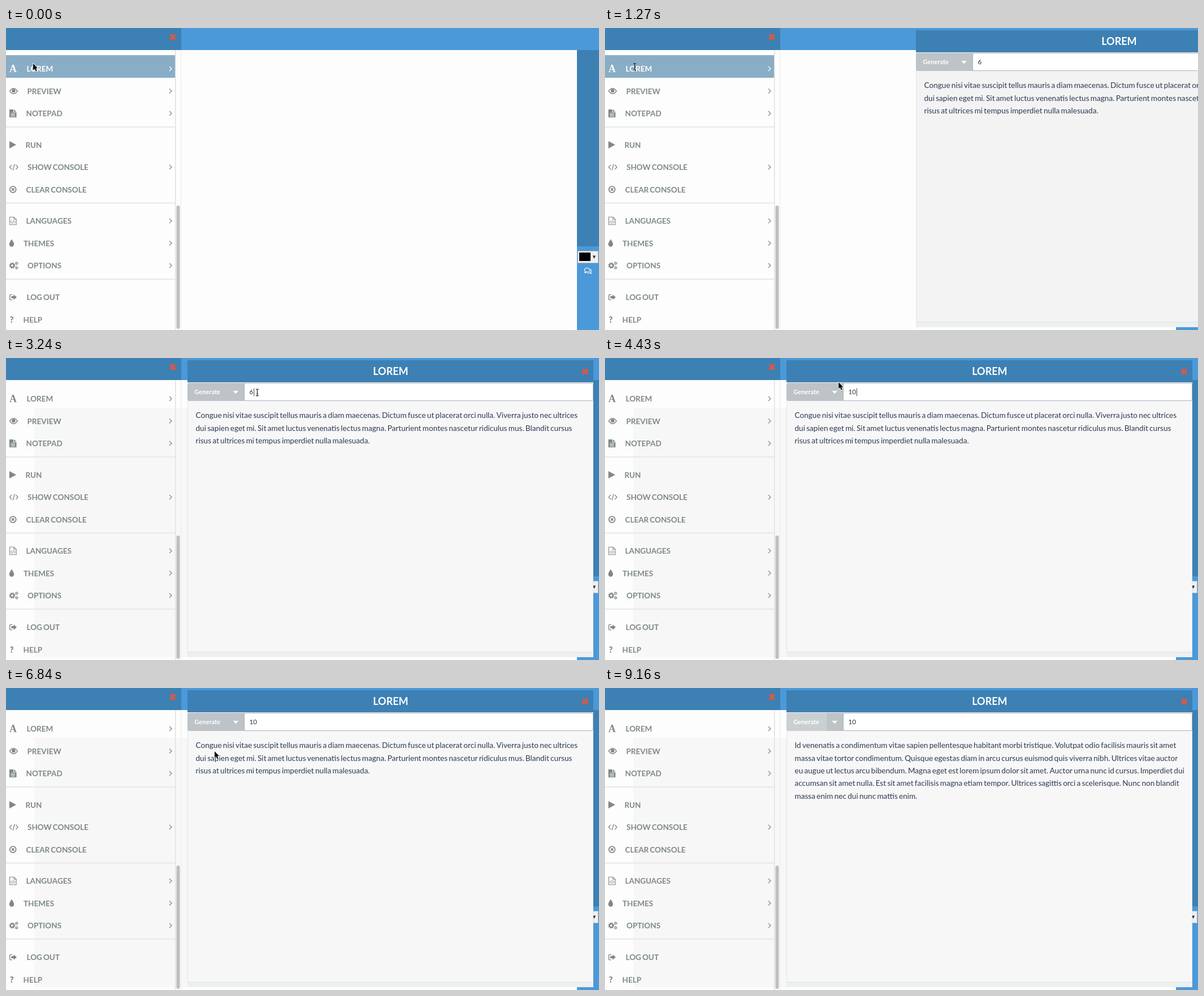
Write an HTML page with a canvas that moves like this. It is 1049 px wide and 534 px high and loops after 9.71 s.

```html
<!DOCTYPE html>
<html lang="en">
<head>
<meta charset="utf-8">
<title>Lorem panel</title>
<style>
html, body { margin: 0; width: 100%; height: 100%; overflow: hidden; background: #fdfdfd; }
canvas { display: block; width: 1049px; height: 534px; }
</style>
</head>
<body>
<canvas id="stage"></canvas>
<script>
const W = 1049, H = 534, LOOP = 9710;
const canvas = document.getElementById('stage');
const ratio = window.devicePixelRatio || 1;
canvas.width = Math.round(W * ratio);
canvas.height = Math.round(H * ratio);
const c = canvas.getContext('2d');

const DARK = '#3d80b4', LIGHT = '#4b99d9', GREY = '#7f8889', RED = '#e0573f', INK = '#2c3b51';
const PAPER = '#fdfdfd', BUTTON = '#bdc3c7', HOVER = '#cacfd2';
const PANEL = 718;

function rect(x, y, w, h, color) {
  c.fillStyle = color;
  c.fillRect(x, y, w, h);
}

function rounded(x, y, w, h, r, color) {
  c.beginPath();
  c.roundRect(x, y, w, h, r);
  c.fillStyle = color;
  c.fill();
}

function text(str, x, y, size, color, weight = 400, align = 'left', family = 'Lato, sans-serif') {
  c.font = `${weight} ${size}px ${family}`;
  c.wordSpacing = `${-0.09 * size}px`;
  c.textAlign = align;
  c.fillStyle = color;
  c.fillText(str, x, y);
}

function fill(d, color) {
  c.fillStyle = color;
  c.fill(new Path2D(d));
}

function stroke(d, color, width) {
  c.strokeStyle = color;
  c.lineWidth = width;
  c.stroke(new Path2D(d));
}

function dot(x, y, r, color) {
  c.beginPath();
  c.arc(x, y, r, 0, Math.PI * 2);
  c.fillStyle = color;
  c.fill();
}

function ring(x, y, r, width, color) {
  c.beginPath();
  c.arc(x, y, r, 0, Math.PI * 2);
  c.strokeStyle = color;
  c.lineWidth = width;
  c.stroke();
}

function at(x, y, draw) {
  c.save();
  c.translate(x, y);
  draw();
  c.restore();
}

function cross(x, y) {
  at(x, y, () => stroke('M-4.3 -4.3L4.3 4.3M4.3 -4.3L-4.3 4.3', RED, 4));
}

function gear(x, y, r, teeth) {
  ring(x, y, r, r * 0.75, GREY);
  const step = Math.PI * 2 * r * 1.5 / teeth / 2;
  c.setLineDash([step, step]);
  ring(x, y, r * 1.5, r * 0.5, GREY);
  c.setLineDash([]);
}

// Icons are drawn around the middle line of their row.
const icons = {
  letter: col => text('A', 12.5, 6, 18, col, 700, 'center', '"Liberation Serif", serif'),
  eye: col => {
    stroke('M6.5 0Q13.5 -9.5 20.3 0Q13.5 9.5 6.5 0Z', col, 1.4);
    dot(13.4, -0.6, 3.2, col);
  },
  file: col => {
    fill('M6 -7H13V-2H18.5V7H6ZM14 -7L18.5 -3H14Z', col);
    stroke('M8.5 0H16M8.5 2.5H16M8.5 5H16', PAPER, 1);
  },
  play: col => fill('M6 -6.5L18 0L6 6.5Z', col),
  code: col => stroke('M10 -4L6.5 0L10 4M17.5 -4L21 0L17.5 4M15.4 -5.5L12.2 5.5', col, 1.3),
  clear: col => {
    ring(12.3, 0, 5.4, 1.8, col);
    stroke('M10.2 -2.1L14.4 2.1M14.4 -2.1L10.2 2.1', col, 1.8);
  },
  source: col => {
    stroke('M6.6 -6.8H14L18.2 -2.8V6.8H6.6ZM14 -6.8V-2.8H18.2', col, 1.1);
    stroke('M10.2 -.5L8.5 2L10.2 4.5M14.6 -.5L16.3 2L14.6 4.5M13 -1L11.8 5', col, 1);
  },
  drop: col => fill('M10 -7Q14.2 -1 14.2 2A4.2 4.2 0 0 1 5.8 2Q5.8 -1 10 -7Z', col),
  gears: () => {
    gear(11, 0, 3.1, 8);
    gear(18.8, -4, 1.6, 6);
    gear(18.8, 4, 1.6, 6);
  },
  exit: col => {
    stroke('M11 -4.6H8.6Q6.7 -4.6 6.7 -2.7V2.7Q6.7 4.6 8.6 4.6H11', col, 1.4);
    fill('M9.5 -2H13.6V-4.8L19 0L13.6 4.8V2H9.5Z', col);
  },
  help: col => text('?', 10.2, 5, 14.5, col, 900, 'center')
};

// middle y, label x, label, icon, has arrow
const rows = [
  [72, 36.5, 'LOREM', 'letter', 1],
  [111.5, 37.5, 'PREVIEW', 'eye', 1],
  [151, 35.5, 'NOTEPAD', 'file', 1],
  [206.5, 34.5, 'RUN', 'play', 0],
  [246, 38, 'SHOW CONSOLE', 'code', 1],
  [285.5, 35.5, 'CLEAR CONSOLE', 'clear', 0],
  [341, 35.5, 'LANGUAGES', 'source', 1],
  [380.5, 31, 'THEMES', 'drop', 1],
  [420, 38, 'OPTIONS', 'gears', 1],
  [476, 36.5, 'LOG OUT', 'exit', 0],
  [515.5, 30.5, 'HELP', 'help', 0]
];

const before = [
  'Congue nisi vitae suscipit tellus mauris a diam maecenas. Dictum fusce ut placerat orci nulla. Viverra justo nec ultrices',
  'dui sapien eget mi. Sit amet luctus venenatis lectus magna. Parturient montes nascetur ridiculus mus. Blandit cursus',
  'risus at ultrices mi tempus imperdiet nulla malesuada.'
];
const after = [
  'Id venenatis a condimentum vitae sapien pellentesque habitant morbi tristique. Volutpat odio facilisis mauris sit amet',
  'massa vitae tortor condimentum. Quisque egestas diam in arcu cursus euismod quis viverra nibh. Ultrices vitae auctor',
  'eu augue ut lectus arcu bibendum. Magna eget est lorem ipsum dolor sit amet. Auctor urna nunc id cursus. Imperdiet dui',
  'accumsan sit amet nulla. Est sit amet facilisis magna etiam tempor. Ultrices sagittis orci a scelerisque. Nunc non blandit',
  'massa enim nec dui nunc mattis enim.'
];

// Each entry holds from its time on.
const slide = [[0, W + 10], [980, 954], [1050, 870], [1120, 771], [1190, 663], [1270, 550], [1350, 442], [1500, 333], [1640, 321]];
const entry = [[0, '6'], [3950, ''], [4190, '1'], [4310, '10']];
const menuAlpha = [[0, 0], [5170, 0.35], [5240, 0.7], [5310, 0.9], [5400, 1], [6570, 0.8], [6630, 0.5], [6690, 0.2], [6750, 0]];
// time, pointer, x, y, time at which a glide to the next place begins
const pointer = [
  [0, 'arrow', 48, 63],
  [110, 'beam', 52.5, 68.5],
  [1640, 'arrow', 250, 62],
  [1790, 'hand', 349, 62],
  [2000, 'hand', 386, 64, 2260],
  [2610, 'hand', 406, 67, 2870],
  [3010, 'beam', 444.5, 61, 4310],
  [4600, 'arrow', 385, 27, 4600],
  [4900, 'hand', 406, 65, 5660],
  [6300, 'hand', 372, 134, 6570],
  [6780, 'arrow', 369, 112, 6890],
  [7350, 'hand', 377, 68],
  [8610, 'arrow', 582, 216],
  [8650, 'arrow', 721, 326],
  [8700, 'arrow', 826, 460],
  [8780, 'arrow', 842, 486],
  [8990, 'arrow', 893, 492],
  [9050, 'arrow', 976, 521],
  [9110, 'none', 0, 0]
];

const indexAt = (list, t) => list.findLastIndex(k => k[0] <= t);
const valueAt = (list, t) => list[indexAt(list, t)][1];

function drawBackdrop() {
  rect(0, 0, W, H, PAPER);
  rect(310, 0, W - 310, 39, LIGHT);
  rect(1010, 39, 39, 347, DARK);
  rect(1010, 386, 39, H - 386, LIGHT);
  rect(1011, 394, 37, 22, '#b4b4b4');
  rect(1012, 395, 35, 20, '#efefef');
  rect(1014, 397, 20, 15, '#000');
  fill('M1037.8 402.5H1043.2L1040.5 408Z', '#333');
  c.beginPath();
  c.ellipse(1028, 428, 4.6, 3.5, 0, 0, Math.PI * 2);
  c.strokeStyle = '#fff';
  c.lineWidth = 1.2;
  c.stroke();
  stroke('M1025 430.5L1024 433L1027.5 431.5M1033.5 426.5Q1037 429 1034 432L1035.5 434L1032 433Q1030 433.5 1028.5 433', '#fff', 1.2);
}

function drawSidebar(t) {
  if (t >= 1640) rect(50, 88, 271, 441, '#f7f7f7');
  rect(0, 0, 310, 39, DARK);
  cross(295, 16);
  if (t < 1790) rect(0, 48, 299, 40, '#8aadc6');
  for (const y of [174, 308.5, 443]) rect(0, y, 299, 2, '#e7e8e8');
  rect(299, 39, 1, H - 39, '#dedede');
  rect(300, 39, 1, H - 39, '#f1f1f1');
  rect(309, 39, 1, H - 39, '#ebebeb');
  rounded(301.5, 314, 6, 218, 3, '#bfbfbf');
  rows.forEach(([y, x, label, icon, arrow], i) => {
    const color = i === 0 && t < 1790 ? '#fff' : GREY;
    at(0, y, () => {
      icons[icon](color);
      text(label, x, 5, 13.5, color, 700);
      if (arrow) stroke('M289 -4L293 0L289 4', color, 1.2);
    });
  });
}

function drawForm(t) {
  rounded(0, 44, 101, 32, [3, 0, 0, 3], BUTTON);
  if (t >= 5170 && t < 5400) rect(70, 44, 31, 32, HOVER);
  if (t >= 7350) rounded(0, 44, 71, 32, [3, 0, 0, 3], HOVER);
  text('Generate', 12.3, 64, 11.1, '#fff', 700);
  fill('M80.5 58H90L85.25 63.5Z', '#fff');
  rounded(100, 44, PANEL - 100, 32, 3, '#adb3b5');
  rounded(101, 45, PANEL - 102, 30, 2, t >= 1640 && t < 3240 ? '#f8f8f8' : '#fff');
  const value = valueAt(entry, t);
  text(value, 109.6, 64, 11.6, '#27313c');
  if (t >= 3240 && t < 5170) {
    rect(110.5 + c.measureText(value).width, 53.5, 1, 14, '#444');
  }
}

function drawMenu(alpha) {
  if (!alpha) return;
  c.save();
  c.globalAlpha = alpha;
  rect(0, 76, 119, 90, '#f5f5f5');
  ['Words', 'Sentences', 'Paragraphs'].forEach((s, i) => text(s, 11, 106.5 + i * 25.3, 10.7, '#717b80'));
  c.restore();
}

function drawPanel(t) {
  at(valueAt(slide, t), 0, () => {
    rect(0, 4, PANEL, 525, t < 1640 ? '#f3f3f3' : '#f7f7f7');
    rect(0, 4, PANEL, 39, DARK);
    text('LOREM', 359.4, 29.5, 18, '#fff', 700, 'center');
    cross(703.5, 24);
    rect(0, 76, 1, 444, '#e2e4e4');
    rect(PANEL - 1, 76, 1, 444, '#e2e4e4');
    rect(0, 520, PANEL, 9, '#ecf0f0');
    rect(0, 519.5, PANEL, 1, '#dfe2e2');
    drawForm(t);
    const lines = t < 7560 ? before : after;
    lines.forEach((line, i) => text(line, 14.5, 106.3 + i * 22.3, 13.6, INK));
    drawMenu(valueAt(menuAlpha, t));
  });
}

const cursors = {
  none() {},
  arrow() {
    const d = 'M0 0V11.5L2.7 9L4.6 13.3L6.6 12.4L4.8 8.3H8.2Z';
    stroke(d, '#fff', 1.4);
    fill(d, '#000');
  },
  beam() {
    const d = 'M-2.5 -6Q0 -6 0 -4.5Q0 -6 2.5 -6M0 -5V5M-2.5 6Q0 6 0 4.5Q0 6 2.5 6M-1.3 2H1.3';
    stroke(d, '#222', 1.2);
  },
  hand() {
    const d = 'M-3 -5.5Q-1.9 -7.2 -.8 -5.5L.2 -2Q1.4 -3 2.2 -1.6Q3.4 -2.2 4 -.8Q5.4 -1 5.5 .6Q5.8 3.5 4.3 6.3H-1.2Q-2.4 3.8 -4.8 1.4Q-5 -.4 -3.2 .3L-1.8 1.4Z';
    fill(d, '#fff');
    stroke(d, '#111', 1.1);
    stroke('M.8 2V4.5M2.6 2V4.5', '#111', 0.8);
  }
};

function drawPointer(t) {
  const i = indexAt(pointer, t);
  let [, kind, x, y, leave] = pointer[i];
  if (leave !== undefined && t >= leave) {
    const [end, , nx, ny] = pointer[i + 1];
    const tick = Math.floor((t - leave) / 60) * 60 + 30;
    const p = Math.min(1, tick / (end - leave));
    const e = p * p * (3 - 2 * p);
    x += (nx - x) * e;
    y += (ny - y) * e;
    if (kind === 'beam' && x < 422) kind = 'arrow';
  }
  at(x, y, cursors[kind]);
}

function draw(now) {
  const t = now % LOOP;
  c.setTransform(ratio, 0, 0, ratio, 0, 0);
  drawBackdrop();
  drawSidebar(t);
  drawPanel(t);
  drawPointer(t);
}

let start;
function frame(now) {
  start ??= now;
  draw(now - start);
  requestAnimationFrame(frame);
}
requestAnimationFrame(frame);
</script>
</body>
</html>
```
